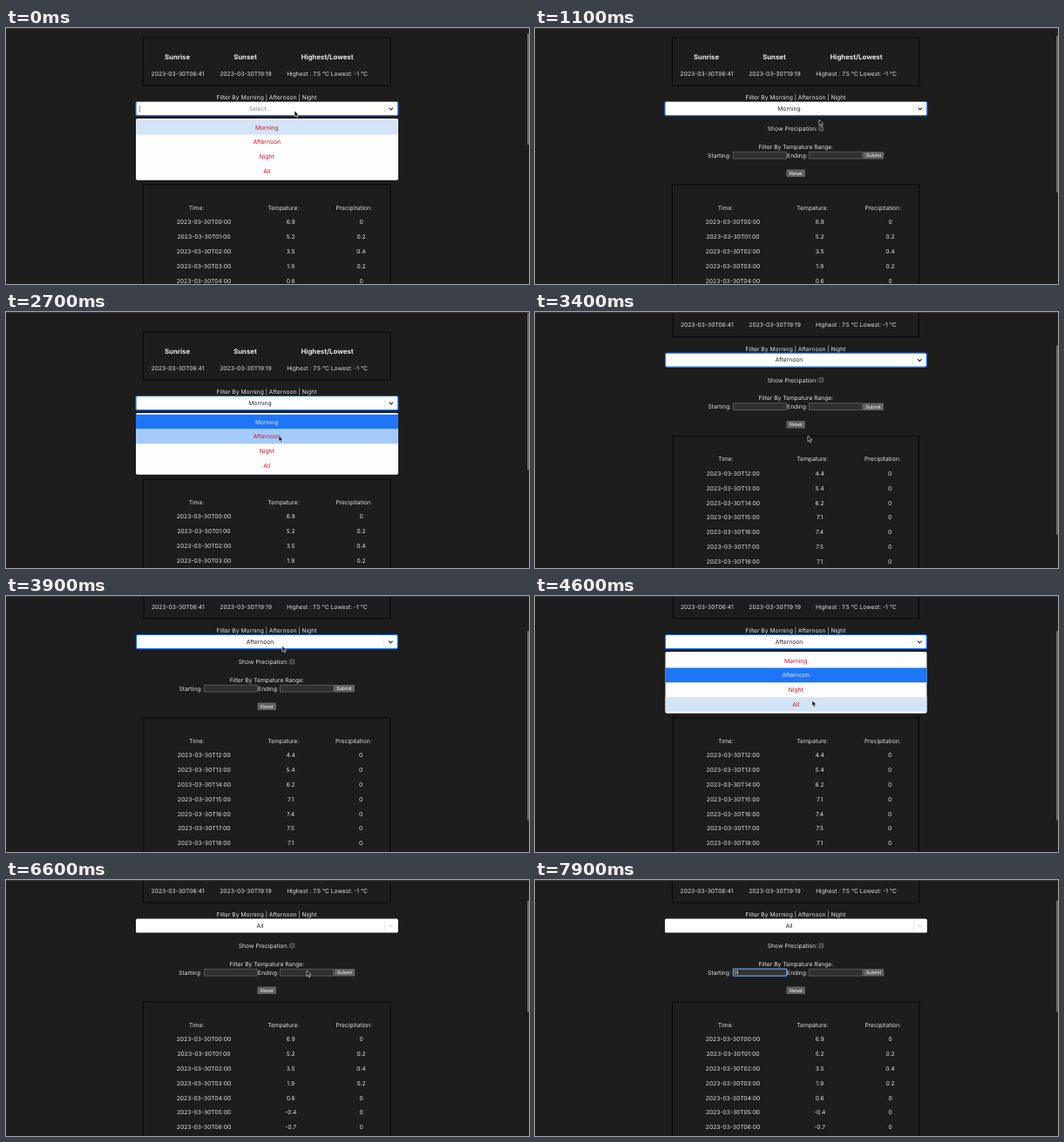
Write an HTML page that moves like this. It is 600 by 294 pixels and loops after 8000 ms.

```html
<!DOCTYPE html>
<html lang="en">
<head>
<meta charset="utf-8">
<title>Weather table filters</title>
<style>
  html, body { margin: 0; width: 100%; height: 100%; overflow: hidden; background: #1d1d1d; }
  svg { display: block; width: 600px; height: 294px; }
  text { font-family: Inter, sans-serif; font-size: 6.72px; text-anchor: middle; fill: #e0e0e0; text-rendering: geometricPrecision; }
  .head { font-size: 7.8px; font-weight: 700; fill: #ececec; }
  .button { font-family: "Liberation Sans", Arial, sans-serif; font-size: 5.6px; fill: #f4f4f4; }
  .start { text-anchor: start; }
  .value { fill: #222; }
  .hint { fill: #808080; }
  .option { fill: #cf1020; }
  .chosen { fill: #e8eefc; }
  .frame { fill: none; stroke: #090909; }
</style>
</head>
<body>
<svg id="stage" viewBox="0 0 600 294"></svg>
<script>
const LOOP = 8000, STEP = 100, GLIDE = 315, ROW = 16.8, VIEW = 294, PAGE_TOP = -14;
const stage = document.getElementById('stage');
const OPTIONS = ['Morning', 'Afternoon', 'Night', 'All'];

// Readings shown in the table; later hours cool down steadily
const READINGS = '6.9 5.2 3.5 1.9 0.6 -0.4 -0.7 -1 -0.6 0.3 1.8 2.9 4.4 5.4 6.2 7.1 7.4 7.5 7.1'.split(' ');
const temperature = hour => READINGS[hour] || (7.1 - 0.6 * (hour - 18)).toFixed(1);
const rain = hour => Math.max(0, 0.4 - 0.2 * Math.min(Math.abs(hour - 2), Math.abs(hour - 22)));

const FILTERS = {
  All: () => true,
  Morning: hour => hour < 12,
  Afternoon: hour => hour >= 12 && hour <= 18
};

// Each move is [start time, ...destination] and eases out over GLIDE
const SCROLL = [[1300, 123], [1800, -12], [3200, 40]];
const POINTER = [[100, 343, 112], [900, 325, 105], [2300, 313, 142], [3700, 317, 53],
                 [4200, 318, 120], [5100, 328, 77], [6300, 345, 104], [6900, 275, 103], [7100, 283, 162]];

function follow(moves, position, t) {
  for (const [start, ...goal] of moves) {
    const p = Math.min(1, Math.max(0, (t - start) / GLIDE));
    const ease = 1 - (1 - p) ** 3;
    position = position.map((v, i) => v + (goal[i] - v) * ease);
  }
  return position;
}

function stateAt(t) {
  const value = t < 500 ? null : t < 2900 ? 'Morning' : t < 5000 ? 'Afternoon' : 'All';
  const checked = t >= 5800 && t < 6300;
  // The menu is held down briefly before it closes
  const closing = [500, 2900, 5000].find(end => t < end);
  const opening = { 500: 0, 2900: 2300, 5000: 4200 }[closing];
  const hours = [...Array(24).keys()].filter(FILTERS[value || 'All']).filter(hour => !checked || rain(hour));
  return {
    value, checked, hours,
    open: t >= opening,
    pressed: t >= closing - 200 && t >= 400,
    selectFocus: t < 5800,
    endFocus: t >= 6700 && t < 7100,
    startFocus: t >= 7100,
    typed: t >= 7900,
    scroll: follow(SCROLL, [0], t)[0],
    pointer: follow(POINTER, [331, 95], t)
  };
}

function draw(s) {
  // Short tables make the page a little narrower
  const squeeze = s.hours.length < 12 ? 0.9965 : 1;
  const X = x => 299.5 + (x - 299.5) * squeeze;
  const text = (x, y, label, cls = '') =>
    `<text class="${cls}" x="${X(x)}" y="${y + (cls === 'head' ? 2.9 : 2.5)}">${label}</text>`;
  const rect = (x1, y1, x2, y2, attrs) =>
    `<rect x="${X(x1)}" y="${y1}" width="${X(x2) - X(x1)}" height="${y2 - y1}" ${attrs}/>`;
  const input = (x, focus) => rect(x + 0.4, 142.2, x + 61.7, 150.1,
    focus ? 'fill="#333" stroke="#6c9fe6" stroke-width="1.3" rx=".8"'
          : 'fill="#303030" stroke="#686868" stroke-width=".7"');
  const button = (x1, y1, x2, y2, label) =>
    rect(x1, y1, x2, y2, 'rx="1.2" fill="#626262"') + text((x1 + x2) / 2, (y1 + y2) / 2 - 0.5, label, 'button');
  const chevron = (color, width) =>
    `<path d="M${X(439.6)} 91.7l2.2 2.2 2.2-2.2" fill="none" stroke="${color}" stroke-width="${width}"/>`;

  const summary = rect(157.5, 11, 441, 66, 'class="frame"') +
    text(196.5, 33, 'Sunrise', 'head') + text(274.5, 33, 'Sunset', 'head') +
    text(368.5, 33, 'Highest/Lowest', 'head') +
    text(197, 52, '2023-03-30T06:41') + text(275, 52, '2023-03-30T19:19') +
    text(368.5, 52, 'Highest : 7.5 °C Lowest: -1 °C');

  const select = text(299, 79.5, 'Filter By Morning | Afternoon | Night') +
    rect(149, 84.5, 449.8, 100.6, `rx="1.7" fill="#fff" ${s.selectFocus ? 'stroke="#1d6fe8" stroke-width="1.2"' : ''}`) +
    text(291.5, 92.4, s.value || 'Select...', s.value ? 'value' : 'hint') +
    (s.value ? '' : rect(153.4, 89, 153.9, 97, 'fill="#333"')) +
    rect(434, 88.2, 434.5, 97.4, 'fill="#c8c8c8"') +
    (s.selectFocus ? chevron('#333', 1.2) : chevron('#c4c4c4', 1));

  const form = text(295.5, 115.5, 'Show Precipation:') +
    rect(325.9, 113, 330.9, 118, s.checked ? 'rx=".8" fill="#3f86f0"'
      : 'rx=".8" fill="#3b3b3b" stroke="#858585" stroke-width=".6"') +
    (s.checked ? `<path d="M${X(327)} 115.6l1.1 1.2 1.8-2.7" fill="none" stroke="#fff" stroke-width=".7"/>` : '') +
    text(299.3, 136, 'Filter By Tempature Range:') +
    text(211.5, 146, 'Starting:') + input(227, s.startFocus) +
    text(301, 146, 'Ending:') + input(314, s.endFocus) +
    (s.typed ? text(228.8, 145.8, '0', 'start button') : '') +
    (s.startFocus ? rect(s.typed ? 232 : 229, 143.5, s.typed ? 232.5 : 229.5, 149, 'fill="#eee"') : '') +
    button(376.3, 142, 400.3, 150.5, 'Submit') + button(288.5, 162.4, 310, 171, 'Reset');

  const table = rect(157.5, 180, 441, 228 + s.hours.length * ROW, 'class="frame"') +
    text(218.5, 206, 'Time:') + text(318.3, 206, 'Tempature:') + text(399.2, 206, 'Precipitation:') +
    s.hours.map((hour, i) => {
      const y = 222.9 + i * ROW;
      return text(227, y, `2023-03-30T${String(hour).padStart(2, '0')}:00`) +
        text(326.7, y, temperature(hour)) + text(407.5, y, rain(hour));
    }).join('');

  return `<g transform="translate(0 ${-s.scroll})">${summary}${form}${table}${select}
    ${s.open ? menu(s, text, rect) : ''}</g>
    <rect width="600" height="1" fill="#3a3a3a"/>${scrollbar(s)}${s.typed ? '' : pointer(s.pointer)}`;
}

function menu(s, text, rect) {
  const top = 105.7;
  const over = Math.floor((s.pointer[1] + s.scroll - top) / ROW);
  const hover = OPTIONS[over] ? over : Math.max(0, OPTIONS.indexOf(s.value));
  return rect(149, 104, 450, 174.7, 'rx="1.7" fill="#fdfdfd"') +
    OPTIONS.map((label, i) => {
      const chosen = label === s.value, y = top + i * ROW;
      const fill = chosen ? '#1d75f8' : i !== hover ? 'none' : s.pressed ? '#a5cbfb' : '#d4e4f7';
      return rect(149, y, 450, y + ROW, `fill="${fill}"`) +
        text(299.2, y + ROW / 2, label, chosen ? 'chosen' : 'option');
    }).join('');
}

function scrollbar({ scroll, hours }) {
  const ratio = VIEW / (282 + 16.4 * hours.length);
  return `<rect x="598" y="${(scroll - PAGE_TOP) * ratio}" width="2.6" height="${VIEW * ratio}" rx="1.3" fill="#696969"/>`;
}

function pointer([x, y]) {
  return `<path transform="translate(${x} ${y})" d="M0 0v6.6l1.5-1.4 1.1 2.5 1.2-.5-1.1-2.4h2.1z"
    fill="#080808" stroke="#f2f2f2" stroke-width=".6" stroke-linejoin="round"/>`;
}

let shown = -1;
function tick() {
  const t = Math.floor(performance.now() % LOOP / STEP) * STEP;
  if (t !== shown) stage.innerHTML = draw(stateAt(shown = t));
  requestAnimationFrame(tick);
}
tick();
</script>
</body>
</html>
```
